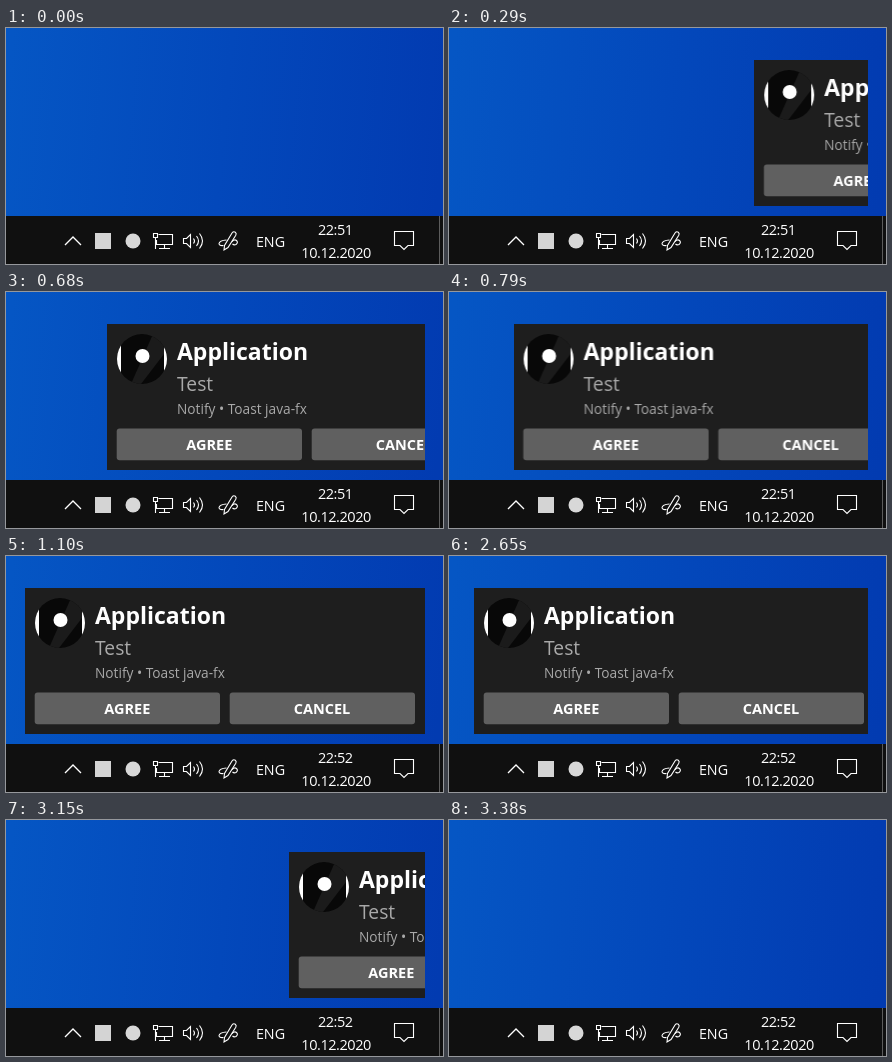
An HTML page for the animation above (3.49 s loop, 437x236 px).

```html
<!DOCTYPE html>
<html lang="en">
<head>
<meta charset="utf-8">
<title>Toast notification</title>
<style>
html, body { margin: 0; width: 100%; height: 100%; overflow: hidden; background: #101010; }
#stage { display: block; width: 100vw; height: 100vh; }
text { font-family: "Open Sans", "Noto Sans", sans-serif; fill: #fff; }
.mid { text-anchor: middle; }
.clock { font-size: 14.5px; letter-spacing: -.45px; }
.lang { font-size: 14.3px; }
.title { font-size: 23px; font-weight: 700; }
.sub { font-size: 19.3px; fill: #a9a9a9; }
.app { font-size: 13.7px; fill: #a9a9a9; }
.label { font-size: 14.5px; font-weight: 700; }
.btn { fill: #606060; }
.line { fill: none; stroke: #fff; stroke-width: 1.1; }

#toast { animation: slide 3490ms infinite; }
#before { animation: before 3490ms step-end infinite; }
#after { animation: after 3490ms step-end infinite; }

@keyframes slide {
  0% { transform: translateX(420px); animation-timing-function: step-end; }
  5.444% { transform: translateX(356px); animation-timing-function: steps(8); }
  12.893% { transform: translateX(220.6px); animation-timing-function: steps(7); }
  19.484% { transform: translateX(101px); animation-timing-function: step-end; }
  20.343% { transform: translateX(87px); animation-timing-function: step-end; }
  20.916% { transform: translateX(76px); animation-timing-function: steps(5); }
  25.501% { transform: translateX(19px); animation-timing-function: step-end; }
  75.931% { transform: translateX(25px); animation-timing-function: step-end; }
  76.79% { transform: translateX(41px); animation-timing-function: steps(5); }
  83.381% { transform: translateX(162.4px); animation-timing-function: steps(6); }
  90.257% { transform: translateX(283px); animation-timing-function: step-end; }
  91.117% { transform: translateX(299px); animation-timing-function: steps(8); }
  96.848%, 100% { transform: translateX(420px); }
}
@keyframes before { 0% { opacity: 1; } 31.518%, 100% { opacity: 0; } }
@keyframes after { 0% { opacity: 0; } 31.518%, 100% { opacity: 1; } }
</style>
</head>
<body>
<svg id="stage" viewBox="0 0 437 236" preserveAspectRatio="none">
  <defs>
    <linearGradient id="sky" gradientUnits="userSpaceOnUse" x1="0" y1="70" x2="437" y2="110">
      <stop offset="0" stop-color="#0556c4"/>
      <stop offset=".5" stop-color="#0348bb"/>
      <stop offset="1" stop-color="#023bb1"/>
    </linearGradient>
    <clipPath id="round"><circle cx="35" cy="67" r="25"/></clipPath>
  </defs>

  <rect width="437" height="188" fill="url(#sky)"/>

  <!-- toast, cut off at x = 419 -->
  <svg width="419" height="188">
    <g id="toast">
      <rect y="32" width="400" height="146" fill="#1e1e1e"/>
      <circle cx="35" cy="67" r="25" fill="#080808"/>
      <g clip-path="url(#round)">
        <path d="M46 42L57 50V62L34 92H24Z" fill="#1b1b1b"/>
        <path d="M10 42H14V92H10ZM57 42H60V92H57Z" fill="#fff"/>
      </g>
      <circle cx="35.5" cy="64" r="7" fill="#fff"/>
      <text class="title" x="70" y="68">Application</text>
      <text class="sub" x="70" y="99">Test</text>
      <text class="app" x="70" y="122">Notify • Toast java-fx</text>
      <rect class="btn" x="9.7" y="136.6" width="185.3" height="31.6" rx="3"/>
      <rect class="btn" x="204.7" y="136.6" width="185.3" height="31.6" rx="3"/>
      <text class="label mid" x="102.3" y="158">AGREE</text>
      <text class="label mid" x="297" y="158">CANCEL</text>
    </g>
  </svg>

  <!-- taskbar -->
  <rect y="188" width="437" height="48" fill="#101010"/>
  <path class="line" d="M59 217L67 209L75 217" style="stroke-width:1.3"/>
  <rect x="89" y="205" width="16" height="16" fill="#d4d4d4"/>
  <circle cx="127" cy="213" r="7.5" fill="#d8d8d8"/>

  <g class="line">
    <path d="M152.5 206.5H166.5V216.5H150.5V212M158.5 216.5V220.5M153 220.5H164"/>
    <path d="M147.5 205.5H151.5V209.5H147.5ZM149.5 209.5V221"/>
  </g>

  <g class="line">
    <path d="M177.5 210.5H180.5L184.5 206.5V219.5L180.5 215.5H177.5Z"/>
    <path d="M187.5 210.5Q189.5 213 187.5 215.5M190.5 208Q194.5 213 190.5 218M193.5 205.5Q199.5 213 193.5 220.5"/>
  </g>

  <g class="line">
    <path d="M218 222L218.5 217.5L226 205Q227.5 203 229.3 204.2Q230.8 205.4 229.8 207.2L222 219.5Z"/>
    <path d="M220.5 212Q213.5 212.5 213 215.5Q213 218 217.5 217.5M226 213.5Q228.5 211 230.5 212.5Q232.5 214.5 230 216.5Q228 217.5 226.5 216"/>
  </g>

  <text class="lang mid" x="264.5" y="218.7">ENG</text>
  <text id="before" class="clock mid" x="329.3" y="207">22:51</text>
  <text id="after" class="clock mid" x="329.3" y="207">22:52</text>
  <text class="clock mid" x="330.1" y="230">10.12.2020</text>

  <path class="line" d="M388.5 203.5H407.5V217.5H402L398 221.5L394 217.5H388.5Z"/>
  <rect x="433" y="188" width="1" height="48" fill="#5c5c5c"/>
</svg>
</body>
</html>
```
